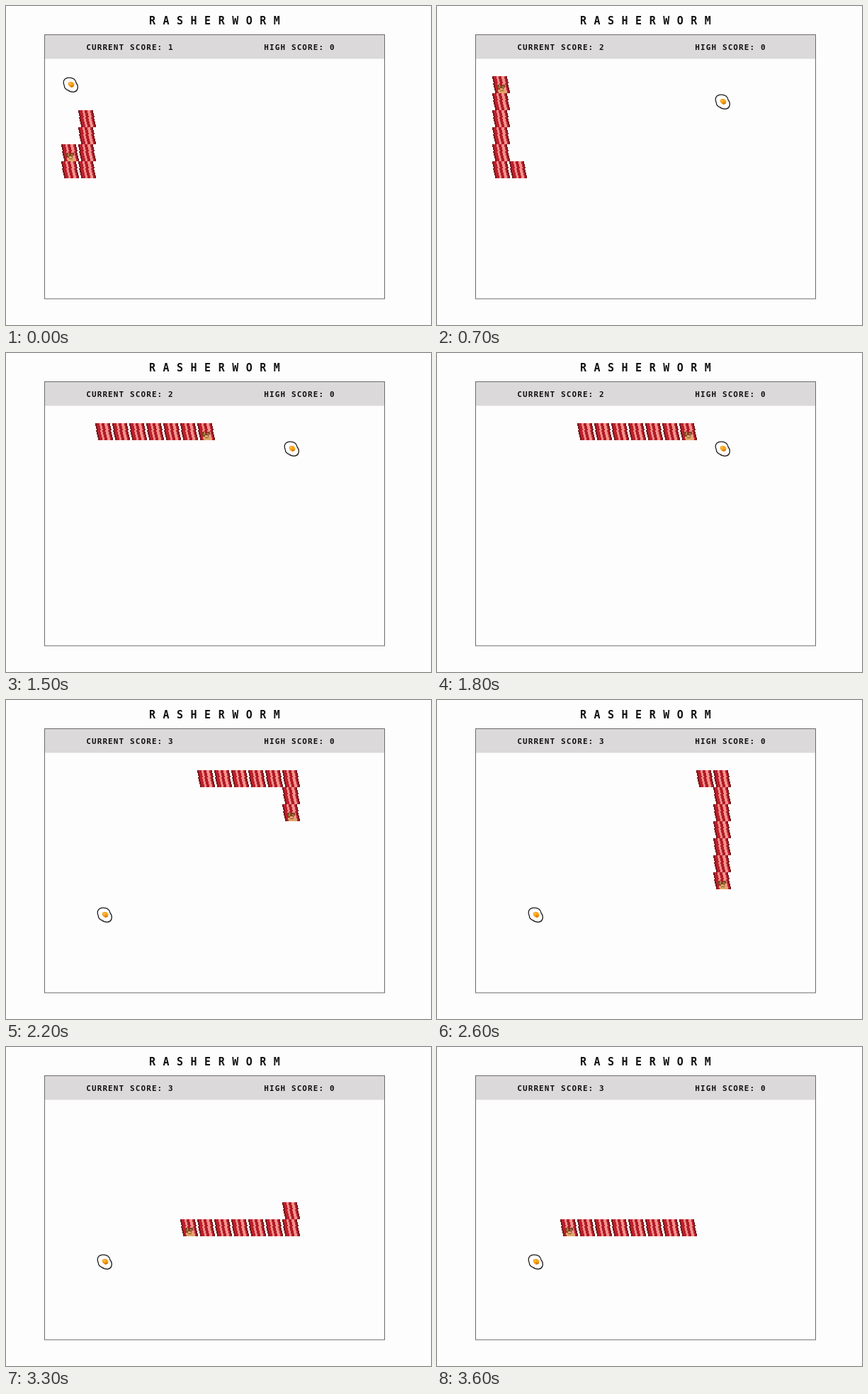
An HTML page that plays this animation: 600 by 450 pixels, repeating every 3700 ms.

```html
<!DOCTYPE html>
<html lang="en">
<head>
<meta charset="utf-8">
<title>Rasherworm</title>
<style>
  html, body { margin: 0; width: 100%; height: 100%; overflow: hidden; background: #fefdfe; }
  svg { display: block; width: 600px; height: 450px; }
  text { font-family: "DejaVu Sans Mono", monospace; font-weight: 700; fill: #121212; }
  .title { font-size: 15px; letter-spacing: 10.5px; }
  .score { font-size: 11px; letter-spacing: 1.1px; text-anchor: middle; }
</style>
</head>
<body>
<svg viewBox="0 0 600 450">
  <defs>
    <g id="bacon" shape-rendering="crispEdges"></g>
    <g id="face" shape-rendering="crispEdges">
      <path fill="#7a4a22" d="M7 12h3v2h4v-2h4v4h-2v3h-7v-2h-2z"/>
      <path fill="#a9803f" d="M9 14h2v3h-2zM14 14h2v2h-2z"/>
      <path fill="#dfa76a" d="M8 19h3v-2h4v2h4v3h2v2h-12v-2h-1z"/>
      <path fill="#8c5426" d="M11 20h5v1h-5z"/>
    </g>
    <g id="egg">
      <path fill="#fff" stroke="#1c1a18" stroke-width="1.3"
        d="M3.4 7.5Q5 3.2 9 2.8Q15 2.2 18 4.6Q20.5 6.6 21 10Q23.8 13 23.2 17.5Q22 22.4 17 22.8Q12 22.8 9.5 20.3Q4.6 18.6 4.3 14Q2.6 11 3.4 7.5z"/>
      <path fill="none" stroke="#e4dfda" stroke-width="1" d="M8 18Q12 21.5 17 20.8"/>
      <path fill="#f6a019" d="M10 9.5L13 8.2L16.5 9L18.5 12L17.8 15.2L14.5 16.6L11.5 15L9.7 12.5z"/>
      <path fill="#ffc04a" d="M11 10h3v2h-3z"/>
      <path fill="#df7d0c" d="M14 13.5h4l-.6 1.8l-2.9 1.2l-1.5-.8z"/>
    </g>
  </defs>
  <rect width="600" height="450" fill="#fefdfe"/>
  <text class="title" x="202" y="26">RASHERWORM</text>
  <rect x="54" y="41" width="480" height="33.5" fill="#dbd9da"/>
  <rect x="54.5" y="40.5" width="480" height="372.5" fill="none" stroke="#6c6b6c"/>
  <text class="score" id="current" x="175" y="62"></text>
  <text class="score" x="414.5" y="62">HIGH SCORE: 0</text>
  <g transform="translate(54 74.5)">
    <use id="food" href="#egg"/>
    <g id="snake"></g>
  </g>
</svg>
<script>
const CELL = 24, STEP = 100, LOOP = 3700;
const $ = id => document.getElementById(id);

function make(tag, parent, attrs) {
  const node = document.createElementNS("http://www.w3.org/2000/svg", tag);
  for (const key in attrs) node.setAttribute(key, attrs[key]);
  return parent.appendChild(node);
}

// Each stripe follows the same stepped slant, two pixels per row.
const slant = [0, 0, 1, 1, 2, 1, 2, 2, 3, 3, 4, 4];
const stripes = [
  ["#76191c", 2], ["#bd1f2b", 4], ["#f08c88", 3], ["#b01c27", 4],
  ["#f3918c", 4], ["#c0222e", 2], ["#76191c", 2]
];
let left = 0;
for (const [fill, width] of stripes) {
  const d = slant.map((dx, row) => `M${left + dx} ${row * 2}h${width}v2h${-width}z`).join("");
  make("path", $("bacon"), { fill, d });
  left += width;
}

// Corners of the route, expanded to one entry per cell.
const corners = [[2, 3], [2, 6], [1, 6], [1, 1], [14, 1], [14, 7], [5, 7]];
const route = [corners[0]];
for (const [endX, endY] of corners.slice(1)) {
  let [x, y] = route[route.length - 1];
  while (x !== endX || y !== endY) {
    x += Math.sign(endX - x);
    y += Math.sign(endY - y);
    route.push([x, y]);
  }
}

const meals = [[1, 1], [14, 2], [3, 9]];
const mealSteps = [9, 23];
const segments = Array.from({ length: 8 }, () => make("use", $("snake"), { href: "#bacon" }));
const face = make("use", $("snake"), { href: "#face" });

function place(node, [x, y]) {
  node.setAttribute("x", x * CELL);
  node.setAttribute("y", y * CELL);
}

function headIndex(tick) {
  if (tick < 4) return 5;
  return tick + (tick < 33 ? 2 : 1);
}

function draw(time) {
  const head = headIndex(Math.floor((time % LOOP) / STEP));
  const eaten = mealSteps.filter(step => head >= step).length;
  segments.forEach((node, i) => {
    const shown = i < 6 + eaten;
    node.setAttribute("visibility", shown ? "visible" : "hidden");
    if (shown) place(node, route[head - i]);
  });
  place(face, route[head]);
  place($("food"), meals[eaten]);
  $("current").textContent = `CURRENT SCORE: ${1 + eaten}`;
}

const start = performance.now();
function frame() {
  draw(performance.now() - start);
  requestAnimationFrame(frame);
}
frame();
</script>
</body>
</html>
```
